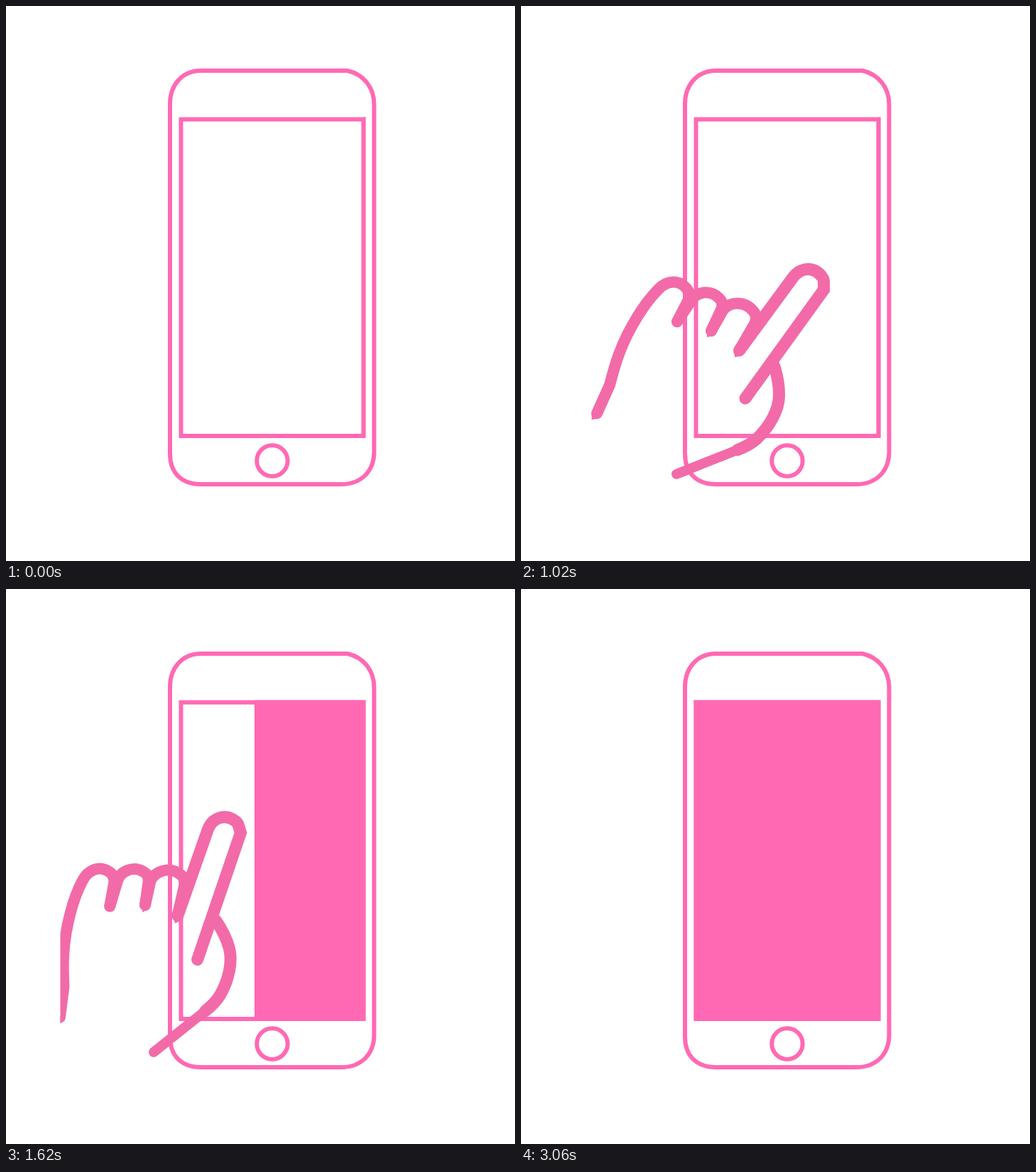
An HTML page that plays this animation: 717x781 px, repeating every 3.21 s.

```html
<!DOCTYPE html>
<html lang="en">
<head>
<meta charset="utf-8">
<title>Swipe</title>
<style>
  html, body { margin: 0; width: 100%; height: 100%; overflow: hidden; background: #fff; }
  svg { display: block; width: 100%; height: 100%; }
</style>
</head>
<body>
<svg viewBox="0 0 717 781">
  <defs>
    <clipPath id="stage"><rect x="76.5" y="0" width="641" height="781"/></clipPath>
  </defs>

  <g fill="none" stroke="#ff69b4" stroke-width="6">
    <path d="M275 91H481C503 96 518.5 114 518.5 138V625C519.5 655 500 673 472 673H275C247 673 231 657 231 630V138C231 112 247 91 275 91Z"/>
    <rect x="246.5" y="159.5" width="257" height="445.5"/>
    <circle cx="375" cy="640" r="21.7"/>
  </g>
  <rect id="panel" y="156.5" height="451.5" fill="#ff69b4"/>

  <g clip-path="url(#stage)">
    <g id="hand" fill="none" stroke="#f26ba8" stroke-width="16" stroke-linecap="round" stroke-miterlimit="6">
      <!-- wrist and first knuckle -->
      <path d="M107 573L125 533C129 518 132 505 139 487Q148 463 164 437Q178 414 194 398C206 386 222 385 232 396Q240 404 235 415L220 444"/>
      <!-- second and third knuckles -->
      <path d="M220 444L240 414C248 401 268 399 279 411Q286 418 282 427L268 457"/>
      <path d="M268 457L285 427C294 416 315 414 327 429Q334 437 329 447L307 485"/>
      <!-- index finger -->
      <path stroke-width="17" d="M308 484L383 382C394 367 413 366 424 381Q426.5 384 426.5 388V399L316 552"/>
      <!-- thumb side -->
      <path stroke-width="17" d="M357 507C361 520 364 533 363.5 549C363 569 350 592 332 609Q322 618 305 624.5"/>
      <path stroke-width="14" d="M332 608Q322 617 305 624.5L219 658.5"/>
      <!-- cut ends -->
      <path stroke="none" fill="#f26ba8" d="M99.5 572V582L110 580 115 571ZM262 455V466L272 463ZM300 483L301 494 311 492Z"/>
    </g>
  </g>
</svg>
<script>
const LOOP = 3210, STEP = 30;
const ARRIVE = 1080, STOP = 1620, LEAVE = 2790, END = 3060;
const panel = document.getElementById('panel');
const hand = document.getElementById('hand');

const progress = (t, from, to) => Math.min(1, Math.max(0, (t - from) / (to - from)));
const mix = (a, b, p) => a + (b - a) * p;

function draw(t) {
  const swipe = progress(t, ARRIVE, STOP);
  const early = Math.min(0, (t - ARRIVE) / STEP);
  const away = t < LEAVE ? 0 : 6.2 + 29 * (t - LEAVE) / STEP;

  const x = mix(297.6, 211.4, swipe) + 15.3 * early - away;
  const y = mix(501, 498.6, swipe) - 6.07 * early + 0.75 * away;
  hand.setAttribute('transform',
    `translate(${x} ${y}) rotate(${-17 * swipe}) translate(-267 -513)`);

  const edge = mix(mix(503, 350, swipe), 243.5, progress(t, LEAVE, END));
  panel.setAttribute('x', edge);
  panel.setAttribute('width', 506.5 - edge);
}

const start = performance.now();
function tick() {
  const t = (performance.now() - start) % LOOP;
  draw(Math.floor(t / STEP) * STEP);
  requestAnimationFrame(tick);
}
tick();
</script>
</body>
</html>
```
